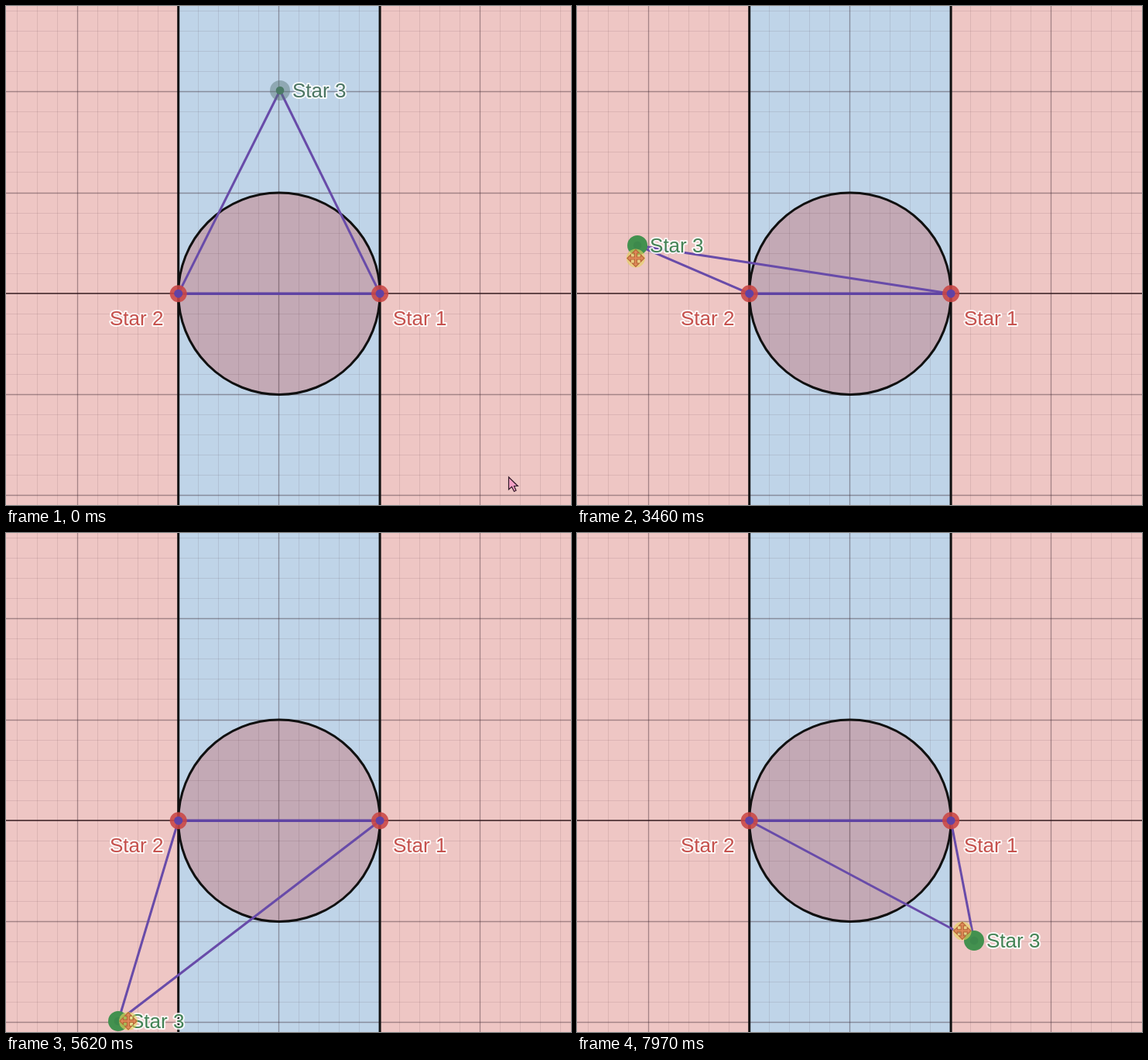
Recreate the animation shown at these times as an HTML page with a canvas. Size 730 by 644 pixels, loop 8 s.

```html
<!DOCTYPE html>
<html lang="en">
<head>
<meta charset="utf-8">
<title>Triangle explorer</title>
<style>
  html, body { margin: 0; width: 100%; height: 100%; overflow: hidden; }
  canvas { display: block; }
</style>
</head>
<body>
<canvas id="stage" width="730" height="644"></canvas>
<script>
const W = 730, H = 644, LOOP = 8000;
const STEP = 69.4, DRAG_AT = 1230;   // screen refresh and start of the drag, ms
const HOVER = -6, PRESS = -5;        // in steps from the start of the drag
const CURSOR_LEAD = .9;              // steps the cursor runs ahead of the point
const ctx = document.getElementById('stage').getContext('2d');
const MID = { x: 352.9, y: 371.2 }, R = 130.2, CELL = 26;
const LEFT = MID.x - R, RIGHT = MID.x + R;

// Bends of the dragged path: step, x, y
const PATH = [
  [-1, 354, 109], [6, 269, 130], [11, 180, 148], [21, 104.5, 156],
  [35, 70, 361], [43, 35, 492], [59, 93, 628], [63, 145, 630],
  [80, 410, 604], [92, 550, 572], [97, 513, 526], [98, 496, 512]
];

// Smooth interpolation of one column without overshoot
function sample(col, k) {
  const last = PATH.length - 1;
  k = Math.min(Math.max(k, PATH[0][0]), PATH[last][0]);
  const slope = i => (PATH[i + 1][col] - PATH[i][col]) / (PATH[i + 1][0] - PATH[i][0]);
  const tangent = i => {
    if (i === 0) return slope(0);
    if (i === last) return slope(last - 1);
    const a = slope(i - 1), b = slope(i);
    return a * b <= 0 ? 0 : 2 * a * b / (a + b);
  };
  let i = 0;
  while (PATH[i + 1][0] < k) i++;
  const h = PATH[i + 1][0] - PATH[i][0], u = (k - PATH[i][0]) / h, v = 1 - u;
  return (1 + 2 * u) * v * v * PATH[i][col] + u * v * v * h * tangent(i)
    + u * u * (3 - 2 * u) * PATH[i + 1][col] - u * u * v * h * tangent(i + 1);
}

const pointAt = k => ({ x: sample(1, k), y: sample(2, k) });

function cursorAt(k) {
  if (k >= 0) return pointAt(k + CURSOR_LEAD);
  const u = Math.min(1, Math.max(0, (k + 18) / (HOVER + 18)));
  const e = u * u * (3 - 2 * u);
  return { x: 649 - 295 * e, y: 608 - 503 * e };
}

function line(x1, y1, x2, y2, color, width) {
  ctx.strokeStyle = color;
  ctx.lineWidth = width;
  ctx.beginPath();
  ctx.moveTo(x1, y1);
  ctx.lineTo(x2, y2);
  ctx.stroke();
}

function disc(x, y, r, color) {
  ctx.fillStyle = color;
  ctx.beginPath();
  ctx.arc(x, y, r, 0, 7);
  ctx.fill();
}

function label(text, x, y, color) {
  ctx.font = '26px "Liberation Sans", Arial, sans-serif';
  ctx.lineJoin = 'round';
  ctx.lineWidth = 4;
  ctx.strokeStyle = 'rgba(255,255,255,.85)';
  ctx.strokeText(text, x, y);
  ctx.fillStyle = color;
  ctx.fillText(text, x, y);
}

function shape(points, fill, stroke) {
  ctx.beginPath();
  points.forEach(([x, y]) => ctx.lineTo(x, y));
  ctx.closePath();
  ctx.fillStyle = fill;
  ctx.fill();
  ctx.strokeStyle = stroke;
  ctx.lineWidth = 1.2;
  ctx.lineJoin = 'miter';
  ctx.stroke();
}

function grid() {
  for (let i = -14; i <= 15; i++) {
    const color = i % 5 ? 'rgba(50,20,30,.095)' : 'rgba(50,30,40,.4)';
    const width = i % 5 ? 1 : 1.3;
    const x = Math.floor(MID.x + i * CELL) + .5;
    const y = Math.floor(MID.y + i * R / 5) + .5;
    line(x, 0, x, H, color, width);
    if (i) line(0, y, W, y, color, width);
  }
  line(0, 371, W, 371, 'rgba(45,20,25,.72)', 2);
}

function plane() {
  ctx.fillStyle = '#eec6c4';
  ctx.fillRect(0, 0, W, H);
  ctx.fillStyle = '#bfd4e8';
  ctx.fillRect(LEFT, 0, 2 * R, H);
  disc(MID.x, MID.y, R, '#c3a9b5');
  grid();
  line(LEFT, 0, LEFT, H, '#101010', 3);
  line(RIGHT, 0, RIGHT, H, '#101010', 3);
  ctx.beginPath();
  ctx.arc(MID.x, MID.y, R, 0, 7);
  ctx.stroke();
}

function arrow({ x, y }) {
  ctx.save();
  ctx.translate(x + .5, y);
  shape([[0, 0], [0, 16], [4, 12.5], [7, 18.5], [9.5, 17.3], [7, 11.5], [11.8, 11.5]], '#f3a0c4', '#301828');
  ctx.restore();
}

function moveCross({ x, y }, pressed) {
  if (pressed) disc(x, y, 12, 'rgba(229,212,92,.62)');
  const arm = [[-1.5, -1.5], [-1.5, -6.5], [-4.5, -6.5], [0, -11], [4.5, -6.5], [1.5, -6.5]];
  const cross = [];
  for (let q = 0; q < 4; q++) {
    const c = Math.cos(q * Math.PI / 2), s = Math.sin(q * Math.PI / 2);
    arm.forEach(([a, b]) => cross.push([x + a * c - b * s, y + a * s + b * c]));
  }
  shape(cross, '#e08a5a', '#b86838');
}

function draw(time) {
  const k = Math.floor((time - DRAG_AT) / STEP);
  const p = pointAt(k), cursor = cursorAt(k);
  const dragging = k >= 0;

  plane();
  line(LEFT, MID.y, p.x, p.y, '#684ba9', 3);
  line(RIGHT, MID.y, p.x, p.y, '#684ba9', 3);
  line(LEFT, MID.y, RIGHT, MID.y, '#5f43a3', 3.5);
  for (const x of [LEFT, RIGHT]) {
    disc(x, MID.y, 11, 'rgba(201,70,68,.88)');
    disc(x, MID.y, 5.5, '#6042a5');
  }
  label('Star 2', 134, 412, '#c5504c');
  label('Star 1', 500, 412, '#c5504c');

  disc(p.x, p.y, 13, dragging ? '#43914f' : 'rgba(85,115,115,.45)');
  disc(p.x, p.y, 5.3, dragging ? 'rgba(50,120,70,.3)' : '#4b7a66');
  label('Star 3', p.x + 16, p.y + 9, dragging ? '#438355' : '#4b7562');

  const over = Math.hypot(cursor.x - p.x, cursor.y - p.y) < 13;
  if (dragging || over) moveCross(cursor, k >= PRESS);
  else arrow(cursor);
}

const start = performance.now();
function tick(now) {
  draw(Math.max(0, now - start) % LOOP);
  requestAnimationFrame(tick);
}
draw(0);
requestAnimationFrame(tick);
</script>
</body>
</html>
```
